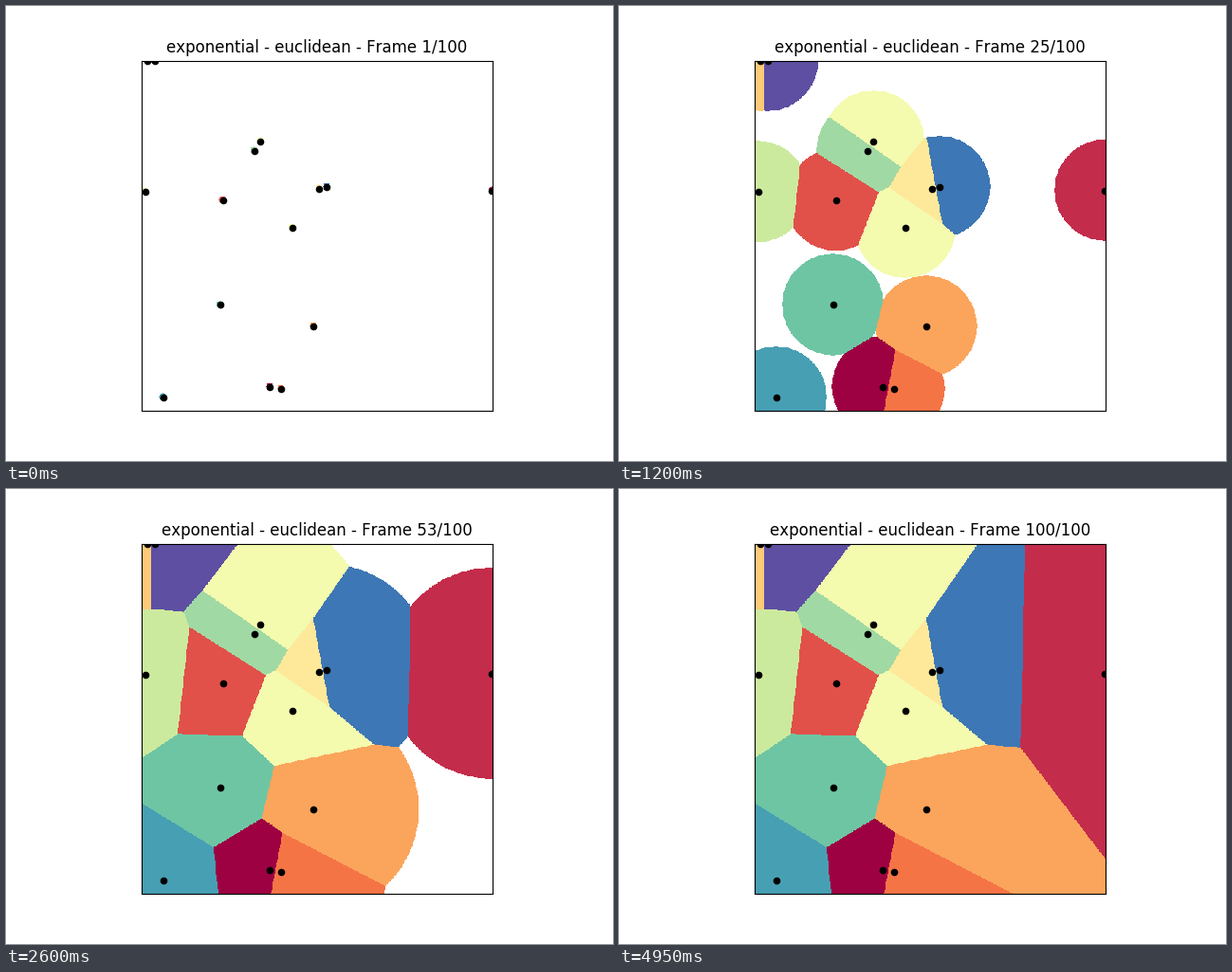
Recreate the animation shown at these times as a matplotlib script. Size 640 by 480 pixels, loop 5 s.

```python
import numpy as np
import matplotlib
import matplotlib.pyplot as plt
from matplotlib.animation import FuncAnimation

SIZE = 500
FRAMES = 100
INTERVAL = 50
START_RADIUS = 5

# Voronoi seeds on the grid, in colour order
SEEDS = np.array([
    (182, 465), (499, 185), (115, 199), (198, 468), (244, 379),
    (8, 0), (252, 182), (214, 238), (169, 115), (4, 187),
    (160, 128), (111, 348), (30, 480), (263, 180), (18, 0),
])

plt.rcParams["font.family"] = "DejaVu Sans"
plt.rcParams["text.kerning_factor"] = 6


def seed_colors():
    cmap = matplotlib.colormaps["Spectral"]
    colors = cmap(np.linspace(0, 1, len(SEEDS)))[:, :3]
    colors[7:9] = matplotlib.colors.to_rgb("#f4faae")  # shared yellow
    return colors


def nearest_seed():
    y, x = np.mgrid[:SIZE, :SIZE]
    dist = np.hypot(x[..., None] - SEEDS[:, 0], y[..., None] - SEEDS[:, 1])
    return dist.argmin(axis=2), dist.min(axis=2)


labels, distance = nearest_seed()
cells = seed_colors()[labels]
radii = np.linspace(START_RADIUS, distance.max(), FRAMES)

fig, ax = plt.subplots(figsize=(6.4, 4.8), dpi=100, facecolor="white")
image = ax.imshow(np.ones_like(cells), interpolation="nearest")
ax.scatter(*SEEDS.T, s=20, c="black")
ax.set(xticks=[], yticks=[], xlim=(-0.5, SIZE - 0.5), ylim=(SIZE - 0.5, -0.5))
title = ax.set_title("")


def update(i):
    covered = distance <= radii[i]
    image.set_data(np.where(covered[..., None], cells, 1.0))
    title.set_text(f"exponential - euclidean - Frame {i + 1}/{FRAMES}")
    return image, title


anim = FuncAnimation(fig, update, frames=FRAMES, interval=INTERVAL,
                     repeat=True, repeat_delay=0)
plt.show()
```
